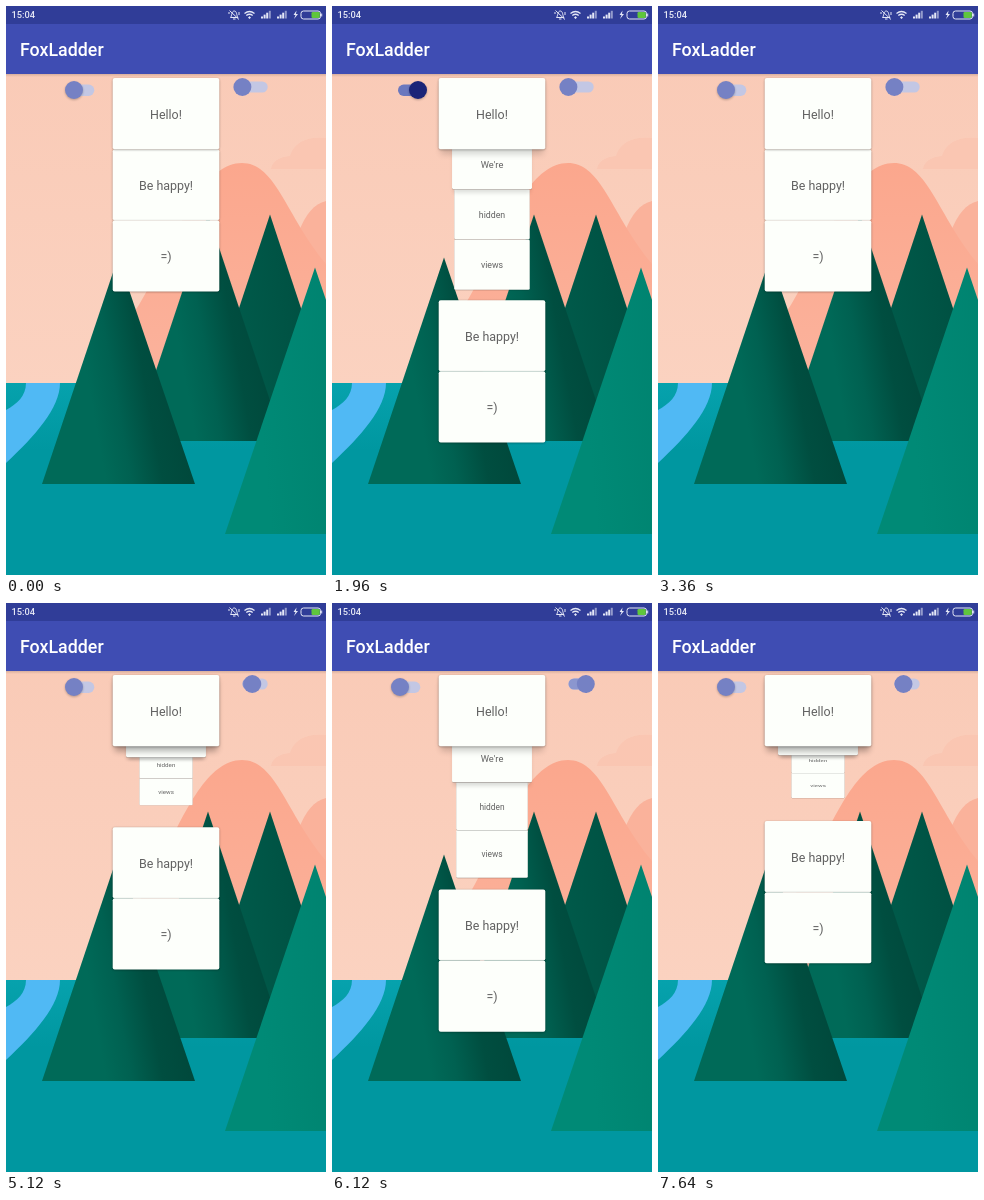
These frames come from a looping animation (320x569 px, 8000 ms). An HTML page:

```html
<!DOCTYPE html>
<html lang="en">
<head>
<meta charset="utf-8">
<title>Folding cards</title>
<style>
html, body { margin: 0; width: 100%; height: 100%; overflow: hidden; background: #0097a0; }
svg { display: block; width: 100%; height: 100%; }
text { font-family: Roboto, sans-serif; }
</style>
</head>
<body>
<svg viewBox="0 0 320 569" preserveAspectRatio="none">
  <defs>
    <linearGradient id="sky" x2="0" y2="1">
      <stop offset="0" stop-color="#f9c9b5"/><stop offset="1" stop-color="#fbd2c0"/>
    </linearGradient>
    <linearGradient id="hill" x2="0" y2="1">
      <stop offset="0" stop-color="#fba78d"/><stop offset="1" stop-color="#fbb39d"/>
    </linearGradient>
    <linearGradient id="water" x2="0" y2="1">
      <stop offset="0" stop-color="#06a2ad"/><stop offset=".35" stop-color="#0097a0"/>
    </linearGradient>
    <linearGradient id="tree" x1=".3" y1=".55" x2=".86" y2=".4">
      <stop offset="0" stop-color="#006a58"/><stop offset=".28" stop-color="#006151"/>
      <stop offset=".62" stop-color="#004e40"/><stop offset="1" stop-color="#00483b"/>
    </linearGradient>
    <linearGradient id="dark" x1=".3" y1=".5" x2=".9" y2=".4">
      <stop offset="0" stop-color="#005a4a"/><stop offset="1" stop-color="#004d3f"/>
    </linearGradient>
    <linearGradient id="light" x1=".2" y1=".6" x2=".9" y2=".5">
      <stop offset="0" stop-color="#008a76"/><stop offset="1" stop-color="#007f6c"/>
    </linearGradient>
    <linearGradient id="drop" x2="0" y2="1">
      <stop offset="0" stop-opacity=".14"/><stop offset="1" stop-opacity="0"/>
    </linearGradient>
    <filter id="soft" x="-20%" y="-20%" width="140%" height="150%"><feGaussianBlur stdDeviation=".8"/></filter>
    <filter id="deep" x="-20%" y="-30%" width="140%" height="170%"><feGaussianBlur stdDeviation="3"/></filter>
  </defs>

  <rect width="320" height="380" fill="url(#sky)"/>
  <path d="M265 163C267 153 276 151 284 150C288 137 300 130 320 132V163Z" fill="#fac6b2"/>
  <path d="M293 225C300 208 308 198 320 195V300H293Z" fill="#fab29b"/>
  <path d="M118 320C160 270 185 157 236 157C270 157 280 210 320 258V380H118Z" fill="url(#hill)"/>
  <rect y="377" width="320" height="192" fill="url(#water)"/>
  <path d="M20 377H54C54 402 29 430 0 457V404C11 398 20 390 20 377Z" fill="#50b9f4"/>
  <path d="M264 208.500L339 435H189Z" fill="url(#dark)"/>
  <path d="M202 208.500L277.500 435H126.500Z" fill="url(#tree)"/>
  <path d="M112 251.500L189 478H36Z" fill="url(#tree)"/>
  <path d="M309 261.500L399 528H219Z" fill="url(#light)"/>

  <rect y="68" width="320" height="3" fill="url(#drop)"/>
  <rect y="18" width="320" height="50" fill="#3f4db3"/>
  <rect width="320" height="18" fill="#303d98"/>
  <text x="5.5" y="12" font-size="9.3" font-weight="500" fill="#e8eaf6">15:04</text>
  <text x="14" y="49.5" font-size="17.8" font-weight="500" fill="#fff">FoxLadder</text>

  <g fill="none" stroke="#e4e7f6" stroke-width="1">
    <path d="M224.5 11.5C226 10 225.5 5 228.3 5S230.500 10 232 11.500ZM227 13H229.500M223.500 4.500L233 13.500M223 8V6M233 6V9"/>
    <path d="M238.500 7.500Q243.500 3.500 248.500 7.500M240.300 9.500Q243.500 7 246.700 9.500" stroke-width="1.300"/>
    <circle cx="243.5" cy="11.6" r=".8" fill="#e4e7f6"/>
    <g id="bars" stroke-width="2"/>
    <path d="M290.500 4.500L287.500 9H289.500L288 13L292 8H290Z" fill="#e4e7f6" stroke="none"/>
    <rect x="295" y="5" width="19.500" height="8" rx="2.500"/>
    <rect x="315.200" y="7.500" width="1" height="3" fill="#e4e7f6" stroke="none"/>
    <rect x="305.500" y="6" width="8.300" height="6" rx="1.200" fill="#5fc63c" stroke="none"/>
  </g>

  <g>
    <rect id="track" x="66" y="78.5" width="22.300" height="11.500" rx="5.700"/>
    <circle id="shade" cy="85" r="9" opacity=".25" filter="url(#soft)"/>
    <circle id="thumb" cy="84" r="9"/>
  </g>
  <g>
    <rect x="236.500" y="75.500" width="25.200" height="11" rx="5.500" fill="#c3c7e4"/>
    <rect id="fill" x="236.500" y="75.500" height="11" rx="5.500" fill="#8b96cf"/>
    <circle id="knob" cy="81" r="9" fill="#7581c4"/>
  </g>
  <g id="cards"></g>
</svg>
<script>
const NS = 'http://www.w3.org/2000/svg';
const $ = id => document.getElementById(id);
const LOOP = 8000, W = 106.6, H = 71.1, TOP = 72.1, MID = 160;

function add(parent, tag, attrs) {
  const el = parent.appendChild(document.createElementNS(NS, tag));
  set(el, attrs);
  return el;
}
function set(el, attrs) {
  for (const k in attrs) el.setAttribute(k, attrs[k]);
}

for (const x of [256, 272])
  for (let i = 0; i < 4; i++)
    add($('bars'), 'path', { d: `M${x + i * 2.6} 12.5v${-2 - i * 1.9}`, opacity: i < 3 ? 1 : .55 });

// Each card is drawn around its own centre.
function makeCard(label) {
  const g = add($('cards'), 'g', {});
  const box = { x: -W / 2, y: -H / 2, width: W, height: H, rx: 2 };
  const deep = add(g, 'rect', { ...box, x: box.x + 2, width: W - 4, y: box.y + 5, filter: 'url(#deep)', opacity: 0 });
  add(g, 'rect', { ...box, y: box.y + .6, filter: 'url(#soft)', opacity: .36 });
  add(g, 'rect', { ...box, fill: '#fdfffb' });
  add(g, 'text', { y: 5.1, 'text-anchor': 'middle', 'font-size': 12.45, fill: '#626262' }).textContent = label;
  return { g, deep };
}
const [views, hidden, were, happy, smile, hello] =
  ['views', 'hidden', "We're", 'Be happy!', '=)', 'Hello!'].map(makeCard);

// Folding cards keep a least width and height.
const folds = [
  { card: were, minX: .75, minY: .55 },
  { card: hidden, minX: .5, minY: .001 },
  { card: views, minX: .5, minY: .001 }
];

function place(card, y, sx = 1, sy = 1) {
  set(card.g, { transform: `translate(${MID} ${y}) scale(${sx} ${sy})` });
}

const clamp = v => Math.max(0, Math.min(1, v));
const ease = v => (1 - Math.cos(Math.PI * clamp(v))) / 2;
const ramp = (t, start, len) => ease((t - start) / len);

// Slider drag: time, value
const drag = [[4560, 0], [5120, .379], [5380, .585], [5760, .82], [6120, .672],
  [6380, .56], [6800, .76], [6960, .85], [7080, .85], [7640, .351]];
const slope = i => (drag[i + 1][1] - drag[i][1]) / (drag[i + 1][0] - drag[i][0]);
function tangent(i) {
  if (i === 0 || i === drag.length - 1) return 0;
  const a = slope(i - 1), b = slope(i);
  return a * b > 0 ? 2 * a * b / (a + b) : 0;
}
function dragAt(t) {
  const last = drag.length - 1;
  if (t <= drag[0][0]) return 0;
  if (t >= drag[last][0]) return drag[last][1];
  let i = 0;
  while (t > drag[i + 1][0]) i++;
  const [t0, a] = drag[i], [t1, b] = drag[i + 1];
  const d = t1 - t0, u = (t - t0) / d, v = 1 - u;
  return a * v * v * (1 + 2 * u) + b * u * u * (3 - 2 * u)
    + d * (tangent(i) * u * v * v - tangent(i + 1) * u * u * v);
}

const mix = (a, b, k) => `rgb(${a.map((v, i) => Math.round(v + (b[i] - v) * k))})`;

function render(t) {
  const on = ramp(t, 1600, 240) - ramp(t, 2800, 240);
  const slide = dragAt(t);
  const p = t < 4000 ? ramp(t, 1630, 520) - ramp(t, 2830, 520) : slide;

  const x = 68 + 18 * on;
  set($('thumb'), { cx: x, fill: mix([117, 129, 196], [26, 36, 120], on) });
  set($('shade'), { cx: x });
  set($('track'), { fill: mix([195, 199, 228], [107, 120, 190], on) });

  const kx = 236.4 + 25.9 * slide;
  set($('knob'), { cx: kx });
  set($('fill'), { width: Math.max(0, kx - 236.5) });

  const edge = TOP + H;
  folds.forEach(({ card, minX, minY }, i) => {
    const y = edge + (i + .5) * H * p - H / 2 * (1 - p);
    place(card, y, Math.max(minX, p), Math.max(minY, p));
    set(card.g, { visibility: p > .002 ? 'visible' : 'hidden' });
  });
  const lift = clamp((1 - p) * 1.8) * clamp(p * 6);
  place(hello, TOP + H / 2);
  set(hello.deep, { opacity: .3 * lift });
  set(were.deep, { opacity: .24 * lift });
  place(happy, edge + H / 2 + 3 * H * p);
  place(smile, edge + H * 1.5 + 3 * H * p);
}

const start = performance.now();
function tick() {
  render((performance.now() - start) % LOOP);
  requestAnimationFrame(tick);
}
tick();
</script>
</body>
</html>
```
